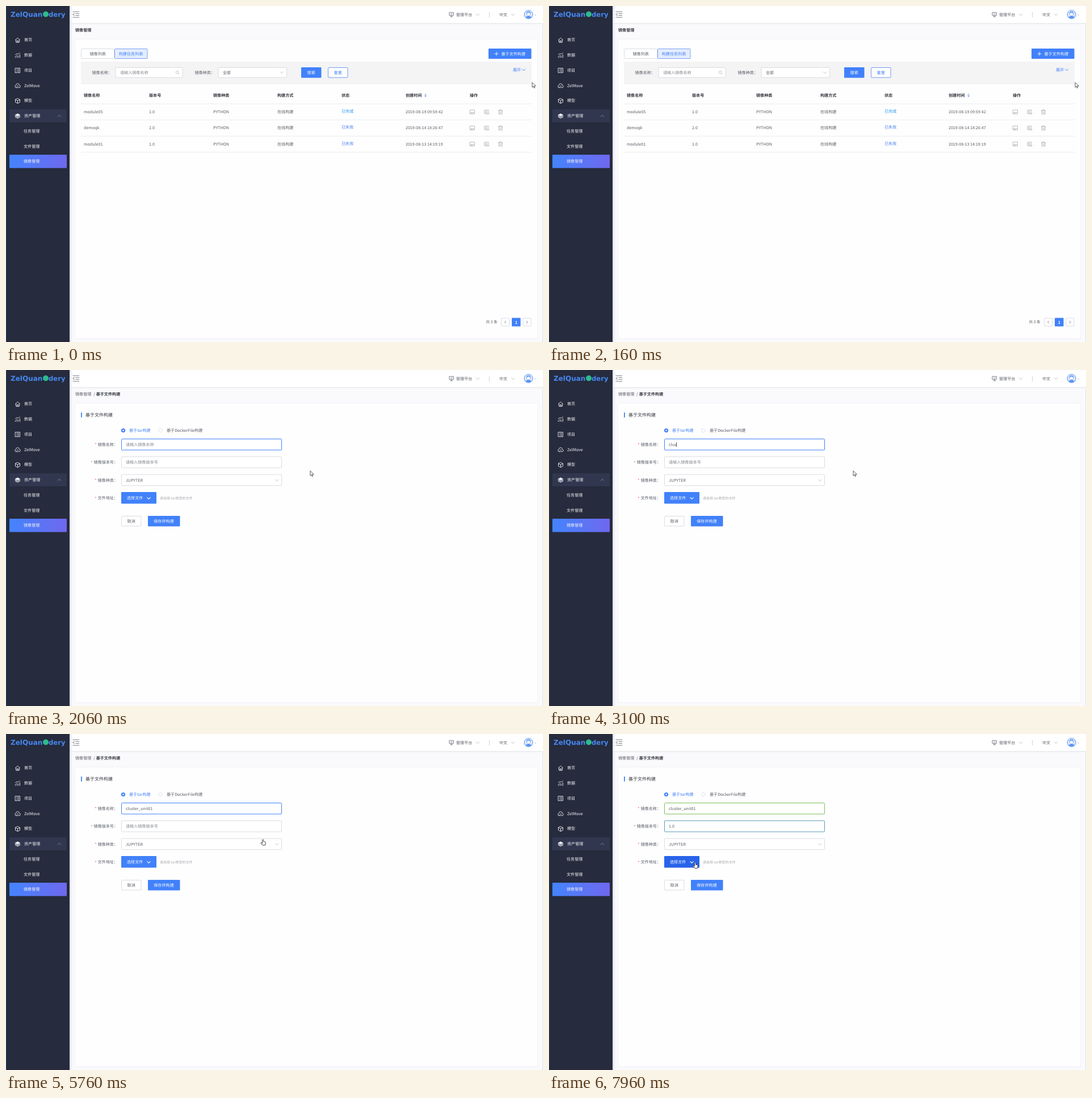
These frames come from a looping animation (946 by 592 pixels, 8 s). An HTML page:

```html
<!DOCTYPE html>
<html>
<head>
<meta charset="utf-8">
<title>镜像管理</title>
<style>
  html, body { margin: 0; width: 100%; height: 100%; overflow: hidden; background: #fafafd; }
  svg { display: block; }
  text { font-family: "Noto Sans CJK SC", "Noto Sans CJK", "Noto Sans", sans-serif; text-rendering: geometricPrecision; white-space: pre; }
  .brand { font-family: "DejaVu Sans", sans-serif; font-weight: bold; }
</style>
</head>
<body>
<svg id="stage" width="946" height="592" viewBox="0 0 946 592">
  <defs>
    <linearGradient id="active"><stop stop-color="#4484fd"/><stop offset="1" stop-color="#6f68ee"/></linearGradient>
    <linearGradient id="edge"><stop stop-color="#d5d8e4"/><stop offset="1" stop-color="#fafafd" stop-opacity="0"/></linearGradient>
    <linearGradient id="under" x2="0" y2="1"><stop stop-color="#e3e4ea"/><stop offset="1" stop-color="#fafafd" stop-opacity="0"/></linearGradient>
  </defs>
</svg>
<script>
const LOOP = 8000;
const BLUE = '#4181fa', DARK_BLUE = '#2863ea', GREEN = '#78c257', LINE = '#dadce2';
const INK = '#595d66', HEAD = '#33363d', HINT = '#85888f', PALE = '#a9abb1';

const text = (x, y, s, fill = INK, weight = 400, size = 7.1, extra = '') =>
  `<text x="${x}" y="${y + size * 0.37}" fill="${fill}" font-weight="${weight}" font-size="${size}" ${extra}>${s}</text>`;
const rect = (x, y, w, h, fill, stroke = 'none', extra = '') =>
  `<rect x="${x}" y="${y}" width="${w}" height="${h}" fill="${fill}" stroke="${stroke}" ${extra}/>`;
const box = (x, y, w, h, stroke = LINE, fill = '#fff', extra = '') =>
  rect(x + .5, y + .5, w - 1, h - 1, fill, stroke, 'rx="1" ' + extra);
const path = (d, stroke, width = 0.8, x = 0, y = 0, fill = 'none') =>
  `<path d="${d}" transform="translate(${x} ${y})" stroke="${stroke}" stroke-width="${width}" fill="${fill}" stroke-linecap="round" stroke-linejoin="round"/>`;
const circle = (x, y, r, fill, stroke = 'none', width = 1) =>
  `<circle cx="${x}" cy="${y}" r="${r}" fill="${fill}" stroke="${stroke}" stroke-width="${width}"/>`;
const chevron = (x, y, stroke, width = 0.7, flip = 1) =>
  path(`M-2.7 ${-1.4 * flip}L0 ${1.4 * flip}L2.7 ${-1.4 * flip}`, stroke, width, x, y);
const centered = 'text-anchor="middle"';

const navIcons = [
  'M-4 0L0-4L4 0M-3-1V4H3V-1M-1 4V1H1V4',
  'M-4 4V2M-1.3 4V0M1.3 4V1M4 4V-1M-4-1L-1-3L1-2L4-4',
  'M-4-4H4V4H-4ZM-2-2H-1.7M0-2H2M-2 0H-1.7M0 0H2M-2 2H-1.7M0 2H2',
  'M-2.5 3.5H2.5A2 2 0 0 0 3-.5A3 3 0 0 0-3-.5A2 2 0 0 0-2.5 3.5ZM-1.5 1.5L0 0L1.5 1.5',
  'M0-4L4-2V2.5L0 4.5L-4 2.5V-2ZM-4-2L0 0L4-2M0 0V4.5',
];
const navLabels = ['首页', '数据', '项目', 'ZelMove', '模型', '资产管理', '任务管理', '文件管理', '镜像管理'];

function sidebar() {
  const rowY = i => 59.7 + i * 26.75;
  let s = rect(112, 0, 6, 592, 'url(#edge)') + rect(0, 0, 112, 592, '#262b3d') + rect(0, 0, 1, 592, '#1d4560');
  s += text(8, 14.7, 'ZelQuan', '#4688f2', 700, 12, 'class="brand"');
  s += circle(70, 14.5, 5, '#2dbb8c');
  s += text(104.5, 14.7, 'dery', '#4688f2', 700, 11.6, 'class="brand" text-anchor="end"');
  s += rect(6, 182, 101, 23, '#30374f', 'none', 'rx="1"') + rect(6, 262, 101, 23.5, 'url(#active)', 'none', 'rx="1"');
  navLabels.forEach((label, i) => {
    s += text(i > 5 ? 31 : 32, rowY(i), label, '#f4f5f8', 500);
    if (navIcons[i]) s += path(navIcons[i], '#e8eaf0', .9, 20.5, rowY(i) + .3);
  });
  s += path('M-4.3-1.5L0-3.8L4.3-1.5L0 .8Z', '#f4f5f8', .6, 20.5, 193.5, '#f4f5f8');
  s += path('M-4.3 .7L0 3L4.3 .7M-4.3 2.5L0 4.8L4.3 2.5', '#f4f5f8', 1, 20.5, 193);
  return s + chevron(94, 193.5, '#8d93a5', .8, -1);
}

function header() {
  let s = rect(112, 0, 834, 30, '#fff') + rect(112, 30, 834, 4, 'url(#under)');
  s += path('M0 0H11M5 3.3H11M5 6.6H11M0 10H11M3 2.8L0 5L3 7.2', '#6a6e78', .9, 117.8, 10);
  s += path('M-3.5-3.5H3.5V1.8H-3.5ZM-2 4H2M0 2V4M-1.5-1.2L0 0L1.6-1.6', '#5d616b', .8, 784.8, 14.8);
  s += text(793, 15, '管理平台') + chevron(831, 15.3, '#a4a7ae') + rect(851, 11, .8, 9, '#c5c7cd');
  s += text(869, 15, '中文') + chevron(893, 15.3, '#a4a7ae');
  s += circle(920.5, 15, 7.5, '#dbe8fd', '#5b93ee', 1) + circle(920.5, 13, 3.6, '#5b93ee');
  s += path('M-5 5Q0-1 5 5Q0 8.5-5 5Z', '#5b93ee', .3, 920.5, 15, '#5b93ee') + circle(920.5, 14.2, 2.7, '#fff');
  return s + rect(931.5, 15.5, 2.5, .8, '#a4a7ae');
}

const panel = () => rect(120.5, 57.5, 817, 529, '#f5f5f9') + rect(122, 59, 814, 526, '#fefefe') + rect(945, 0, 1, 592, '#dfe3f0');

function actions(y) {
  return path('M-3.8-3.5H3.8V3.5H-3.8ZM-3.8 1.2H3.8M-2 2.5H0', PALE, .8, 821.5, y) +
    path('M3.6-.5V-3.2H-3.6V3H0M-2-1H1.5M-2 1H0M1 1.5H4V3.7H1Z', PALE, .8, 846.5, y) +
    path('M-3.8-2.2H3.8M-1.4-2.4V-3.8H1.4V-2.4M-3-2.2V3.7H3V-2.2M-1 0V2M1 0V2', PALE, .8, 871, y);
}

function listPage() {
  let s = panel() + text(122, 42.5, '镜像管理', HEAD, 700);
  s += box(132, 75, 59, 18) + text(161.7, 84.2, '镜像列表', INK, 400, 7.1, centered);
  s += box(191, 75, 58.5, 18, '#79a2f4', '#e4edfd') + text(220, 84.2, '构建任务列表', BLUE, 400, 7.1, centered);
  s += rect(850, 75, 75.5, 18, BLUE, 'none', 'id="create" rx="1"');
  s += path('M-3 0H3M0-3V3', '#fff', .9, 864, 84.2) + text(872.5, 84.2, '基于文件构建', '#fff', 500);
  s += rect(132, 98, 794, 40, '#f4f4f5');
  s += text(151.5, 117.5, '镜像名称：') + box(192.5, 108, 119, 18.5) + text(201, 117.2, '请输入镜像名称', HINT);
  s += circle(301.7, 116.7, 2.4, 'none', PALE, .7) + path('M0 0L1.6 1.6', PALE, .7, 303.5, 118.5);
  s += text(332.5, 117.5, '镜像种类：') + box(373.5, 108, 121.5, 18.5) + text(382, 117.2, '全部') + chevron(486, 117.3, PALE);
  s += rect(520, 108, 35.5, 18.5, BLUE, 'none', 'rx="1"') + text(537.7, 117.5, '搜索', '#fff', 500, 7.1, centered);
  s += box(567, 108, 35.5, 18.5, '#6d9af5') + text(584.7, 117.5, '重置', BLUE, 400, 7.1, centered);
  s += text(893, 112.2, '展开', BLUE) + chevron(912, 112.5, BLUE, .9);

  const columns = [137, 252, 365, 478, 591, 704, 817];
  const titles = ['镜像名称', '版本号', '镜像种类', '构建方式', '状态', '创建时间', '操作'];
  titles.forEach((t, i) => s += text(columns[i], 157, t, HEAD, 600));
  s += path('M-2-.8L0-3L2-.8Z', 'none', 0, 739, 157, '#b5b8bf') + path('M-2 .8L0 3L2 .8Z', 'none', 0, 739, 157, BLUE);
  s += rect(132, 172, 794, .8, '#e7e8ec');
  [['module05', '1.0', '已完成', '2019-08-19 09:59:42'],
   ['demoqk', '2.0', '已失败', '2019-08-14 18:26:47'],
   ['module01', '1.0', '已失败', '2019-08-13 14:19:19']].forEach(([name, version, state, date], r) => {
    const y = 186.3 + r * 28.3;
    [name, version, 'PYTHON', '在线构建', state, date].forEach((v, i) =>
      s += text(columns[i], i === 4 ? y - .8 : y, v, i === 4 ? (r ? '#457cf0' : '#2295f5') : INK));
    s += actions(y + .3) + rect(132, 200.4 + r * 28.4, 794, .8, '#e7e8ec');
  });

  s += text(845.5, 557, '共 3 条', INK, 400, 6.7);
  s += box(872, 549.5, 15, 15) + rect(891, 549.5, 15.5, 15, BLUE, 'none', 'rx="1"') + box(910.5, 549.5, 15, 15);
  s += path('M1-2L-1 0L1 2', '#666a73', .8, 879.5, 557) + path('M-1-2L1 0L-1 2', '#666a73', .8, 918, 557);
  return s + text(898.8, 557, '1', '#fff', 600, 7, centered);
}

function formPage() {
  const label = (x, y, s) => text(x - 5.3, y + .5, '*', '#f0575c') + text(x, y, s);
  let s = panel() + text(122, 42.5, '镜像管理') + text(154, 42.5, '/') + text(158.7, 42.5, '基于文件构建', HEAD, 700);
  s += rect(132, 75, 1.8, 8.5, BLUE) + text(140, 79.4, '基于文件构建', HEAD, 500, 8);
  s += circle(206.5, 106.5, 3.6, BLUE) + circle(206.5, 106.5, 1.3, '#fff') + text(217, 106.5, '基于tar构建', BLUE);
  s += circle(272, 106.5, 3.2, '#fff', LINE, .8) + text(283, 106.5, '基于DockerFile构建');
  s += label(161.5, 131.3, '镜像名称：') + label(154.5, 162.6, '镜像版本号：');
  s += label(161.5, 194, '镜像种类：') + label(161.5, 225.4, '文件地址：');
  s += box(203, 121, 283, 20.5, LINE, '#fff', 'id="nameBox"') + box(203, 152.3, 283, 20.5, LINE, '#fff', 'id="versionBox"');
  s += text(211, 131.3, '请输入镜像名称', HINT, 400, 7.1, 'id="nameText"');
  s += text(211, 162.6, '请输入镜像版本号', HINT, 400, 7.1, 'id="versionText"');
  s += rect(211, 127, .8, 8.5, '#333', 'none', 'id="caret"');
  s += box(203, 183.7, 283, 20.5) + text(211, 194, 'JUPYTER') + chevron(477, 194.3, PALE);
  s += rect(203, 215, 62, 20.5, BLUE, 'none', 'id="choose" rx="1"') + text(213, 225.5, '选择文件', '#fff', 500);
  s += chevron(251.5, 226, '#fff', 1.1) + text(271, 226, '请选择.tar类型的文件', '#a6a8ae', 400, 6);
  s += box(203, 257, 35.5, 18.5) + text(220.7, 266.5, '取消', INK, 400, 7.1, centered);
  return s + rect(250, 257, 56.5, 18.5, BLUE, 'none', 'rx="1"') + text(278, 266.5, '保存并构建', '#fff', 500, 7.1, centered);
}

const cursorShapes =
  `<g id="arrow">${path('M0 0V8.3L2 6.5L3.4 9.6L4.7 9L3.3 6H6Z', '#30323a', .8, 0, 0, '#fff')}</g>` +
  `<g id="hand">${path('M-1 1Q0-.8 1 1V4L4.2 5Q5 5.3 4.7 6.7L4 10.5H-.8L-3.7 6.7Q-3.5 5.4-2.4 6L-1 7Z', '#30323a', .9, 0, 0, '#fff')}</g>` +
  `<g id="beam">${path('M-1.5-4H1.5M0-4V4M-1.5 4H1.5', '#30323a', .8)}</g>`;

const stage = document.getElementById('stage');
stage.insertAdjacentHTML('beforeend',
  rect(0, 0, 946, 592, '#fafafd') + `<g id="list">${listPage()}</g><g id="form">${formPage()}</g>` +
  header() + sidebar() + rect(0, 0, 946, 592, '#000', 'none', 'id="blackout"') + `<g id="cursor">${cursorShapes}</g>`);
const el = id => document.getElementById(id);
const show = (id, on) => el(id).setAttribute('display', on ? 'inline' : 'none');

const PAGE_CHANGE = 930, NAME_FOCUS = 1560, VERSION_FOCUS = 5930, VERSION_BLUR = 7880;
const NAME = 'cluster_unit01', VERSION = '1.0';
const nameKeys = [2460, 2830, 2960, 3100, 3200, 3300, 3430, 4060, 4300, 4500, 4600, 4800, 5100, 5260];
const versionKeys = [6630, 6830, 7060];

// Cursor tip: time, x, y
const route = [
  [500, 927, 135], [800, 888, 86], [950, 886, 86], [1200, 875, 236], [1330, 875, 236],
  [NAME_FOCUS, 430, 132], [1900, 536, 178], [5630, 536, 178], [5760, 453, 185.5],
  [VERSION_FOCUS, 380, 163], [7430, 380, 163], [VERSION_BLUR, 257.5, 226],
];

function cursorAt(t) {
  const next = route.findIndex(p => p[0] > t);
  if (next === 0) return route[0].slice(1);
  if (next < 0) return route[route.length - 1].slice(1);
  const [t0, x0, y0] = route[next - 1], [t1, x1, y1] = route[next];
  const k = (t - t0) / (t1 - t0);
  return [x0 + (x1 - x0) * k, y0 + (y1 - y0) * k];
}

function mix(a, b, k) {
  k = Math.max(0, Math.min(1, k));
  const part = (c, i) => parseInt(c.substr(1 + 2 * i, 2), 16);
  return `rgb(${[0, 1, 2].map(i => Math.round(part(a, i) + (part(b, i) - part(a, i)) * k))})`;
}

function border(id, t, focus, blur) {
  el(id).setAttribute('stroke', t < blur ? mix(LINE, BLUE, (t - focus) / 200) : mix(BLUE, GREEN, (t - blur) / 200));
}

function field(id, t, value, keys, placeholder, clearAt) {
  const node = el(id), typed = value.slice(0, keys.filter(k => k <= t).length);
  node.textContent = t < clearAt ? placeholder : typed;
  node.setAttribute('fill', typed ? INK : HINT);
  return typed ? node.getComputedTextLength() : 0;
}

function render(t) {
  const onForm = t >= PAGE_CHANGE, black = t >= 130 && t < 160;
  show('list', !onForm);
  show('form', onForm);
  show('blackout', black);

  const [x, y] = cursorAt(t);
  const inside = (l, top, r, b) => x >= l && x <= r && y >= top && y <= b;
  const overCreate = !onForm && inside(850, 75, 925, 93);
  const overChoose = onForm && inside(203, 215, 265, 235);
  const overField = onForm && (inside(203, 121, 486, 141) || inside(203, 152, 486, 173));
  const overLink = overCreate || overChoose || (onForm && inside(203, 184, 486, 204));
  show('hand', overLink);
  show('beam', overField);
  show('arrow', !overLink && !overField);
  el('cursor').setAttribute('transform', `translate(${x} ${y})`);
  el('arrow').firstChild.setAttribute('stroke', black ? '#000' : '#30323a');
  el('create').setAttribute('fill', overCreate ? DARK_BLUE : BLUE);
  el('choose').setAttribute('fill', overChoose ? DARK_BLUE : BLUE);

  border('nameBox', t, NAME_FOCUS, VERSION_FOCUS);
  border('versionBox', t, VERSION_FOCUS, VERSION_BLUR);
  const nameWidth = field('nameText', t, NAME, nameKeys, '请输入镜像名称', 2430);
  const versionWidth = field('versionText', t, VERSION, versionKeys, '请输入镜像版本号', 6630);

  const inVersion = t >= VERSION_FOCUS;
  const lastInput = Math.max(...[NAME_FOCUS, ...nameKeys, VERSION_FOCUS, ...versionKeys].filter(k => k <= t));
  show('caret', t >= NAME_FOCUS && t < VERSION_BLUR && (t - lastInput) % 1000 < 500);
  el('caret').setAttribute('x', 211 + (inVersion ? versionWidth : nameWidth));
  el('caret').setAttribute('y', inVersion ? 158.5 : 127);
}

const start = performance.now();
function tick() {
  render((performance.now() - start) % LOOP);
  requestAnimationFrame(tick);
}
tick();
</script>
</body>
</html>
```
